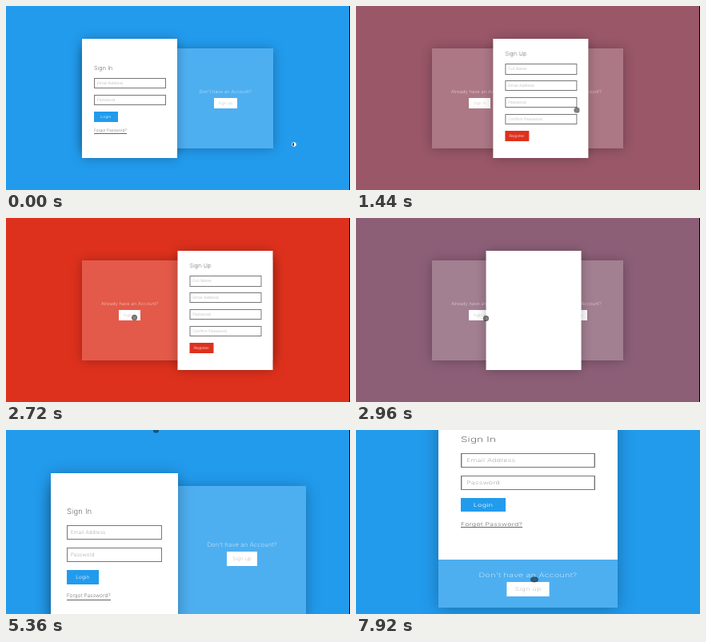
An HTML page that plays this animation: 430 px wide and 230 px high, repeating every 8 s.

```html
<!DOCTYPE html>
<html lang="en">
<head>
<meta charset="utf-8">
<title>Sliding sign in form</title>
<style>
  html, body { margin: 0; width: 100%; height: 100%; overflow: hidden; }
  #stage {
    position: relative; width: 430px; height: 230px; overflow: hidden;
    background: #229bed; color: #333;
    font: 200 16px Inter, Lato, sans-serif;
    letter-spacing: .03em; text-rendering: geometricPrecision;
  }
  #stage div { position: absolute; box-sizing: border-box; white-space: nowrap; }
  .view { left: 0; top: 0; transform-origin: 0 0; }
  .card { left: 0; top: 0; width: 800px; height: 500px; }
  .panel {
    left: 0; top: 40px; width: 100%; height: 420px;
    background: rgba(255, 255, 255, .2);
    box-shadow: 0 5px 45px rgba(0, 0, 0, .28);
  }
  .box { top: 40px; width: 400px; height: 420px; }
  .box.left { left: 0; }
  .box.right { left: 400px; }
  .ask {
    top: 170px; width: 100%; line-height: 30px; text-align: center;
    font-size: 19.2px; color: rgba(255, 255, 255, .9);
  }
  .switch {
    top: 207px; left: 50%; width: 97px; height: 45px; margin-left: -48.5px;
    line-height: 48px; text-align: center; background: #fff; color: #aaa;
  }
  .left .switch { width: 89px; margin-left: -44.5px; }
  .tap { inset: 0; background: rgba(51, 181, 229, .4); opacity: 0; }
  .sheet {
    left: 0; top: 0; width: 400px; height: 500px; background: #fff;
    box-shadow: 0 5px 45px rgba(0, 0, 0, .28);
  }
  .form { left: 50px; top: 0; width: 300px; height: 500px; }
  .title { font-size: 24px; line-height: 36px; }
  .field {
    width: 300px; height: 45px; padding-left: 10px; line-height: 44px;
    border: 1px solid #777; color: #888;
  }
  .send {
    width: 100px; height: 44px; line-height: 48px; text-align: center;
    color: #fff; background: #229bed; font-weight: 300;
  }
  .up .send { background: #dd311d; }
  .forgot { top: 374px; height: 24px; line-height: 25px; border-bottom: 1px solid #666; }

  .phone .card { width: 400px; height: 650px; }
  .phone .panel { top: 0; height: 650px; }
  .phone .box.right { left: 0; top: 364px; }
  .phone .box.left { display: none; }
  .phone .sheet { box-shadow: none; }
  .phone .form { top: 3px; }

  #edge { right: 0; top: 0; width: 1px; height: 230px; background: #000; }
  #touch, #arrow { left: 0; top: 0; border-radius: 50%; }
  #touch {
    width: 7px; height: 7px; margin: -3.5px;
    background: rgba(20, 20, 20, .52); border: 1px solid rgba(30, 30, 30, .35);
  }
  #arrow {
    width: 6px; height: 6px; margin: -3px; border: 1px solid #dcecf6;
    background: linear-gradient(90deg, #23323e 55%, #fff 55%);
  }
</style>
</head>
<body>
<div id="stage"></div>
<script>
const LOOP = 8000;
const stage = document.getElementById('stage');

const div = (cls, body = '', style = '') => `<div class="${cls}" style="${style}">${body}</div>`;

function form(cls, title, fields, button, top, extra = '') {
  const rows = fields.map((f, i) => div('field', f, `top:${top + 70 * i}px`)).join('');
  const end = top + 70 * fields.length;
  return div('form ' + cls,
    div('title', title, `top:${top - 58}px`) + rows + div('send', button, `top:${end}px`) + extra);
}

const box = (side, ask, label) =>
  div('box ' + side, div('ask', ask) + div('switch', label + div('tap')));

function view(name, zoom, x, y, sx = 1) {
  const card =
    div('panel') +
    box('left', 'Already have an Account?', 'Sign in') +
    box('right', "Don't have an Account?", 'Sign up') +
    div('sheet',
      form('in', 'Sign In', ['Email Address', 'Password'], 'Login', 164,
        div('forgot', 'Forgot Password?')) +
      form('up', 'Sign Up', ['Full Name', 'Email Address', 'Password', 'Confirm Password'],
        'Register', 104));
  return div('view ' + name, div('card', card, `zoom:${zoom}`),
    `transform:translate(${x}px,${y}px) scaleX(${sx})`);
}

stage.innerHTML =
  view('desk', .2987, 95, 41) +
  view('large', .3985, 56, 54) +
  view('phone', .4, 103, 8, 1.4) +
  '<div id="edge"></div><div id="arrow"></div><div id="touch"></div>';

const $ = sel => stage.querySelector(sel);
const start = document.timeline.currentTime ?? performance.now();

// steps: [time, value, easing towards the next step]
function run(el, prop, steps) {
  const all = [...steps];
  if (all[0][0] > 0) all.unshift([0, all[0][1]]);
  const last = all[all.length - 1];
  if (last[0] < LOOP) all.push([LOOP, last[1]]);
  const frames = all.map(([t, value, easing = 'linear']) =>
    ({ offset: t / LOOP, [prop]: value, easing }));
  el.animate(frames, { duration: LOOP, iterations: Infinity }).startTime = start;
}

function show(el, ...spans) {
  const steps = [[0, 0, 'step-end']];
  for (const [from, to] of spans) {
    if (from === 0) steps.length = 0;
    steps.push([from, 1, 'step-end']);
    if (to < LOOP) steps.push([to, 0, 'step-end']);
  }
  run(el, 'opacity', steps);
}

const OPEN = 1150, CLOSE = 2730, SLIDE = 500, DELAY = 250;

const swing = (el, prop, a, b) => run(el, prop, [
  [0, a], [OPEN, a, 'ease-in-out'], [OPEN + SLIDE, b],
  [CLOSE, b, 'ease-in-out'], [CLOSE + SLIDE, a]
]);
swing(stage, 'backgroundColor', '#229bed', '#dd311d');
swing($('.desk .sheet'), 'transform', 'translateX(0px)', 'translateX(400px)');

show($('.desk .in'), [0, OPEN], [CLOSE + DELAY, LOOP]);
show($('.desk .up'), [OPEN + DELAY, CLOSE]);
$('.large .up').style.display = $('.phone .up').style.display = 'none';
show($('.desk .right .tap'), [OPEN, 1300]);
show($('.desk .left .tap'), [CLOSE, 2880]);

show($('.desk'), [0, 5360]);
show($('.large'), [5360, 5680]);
show($('.phone'), [5680, LOOP]);
show($('#edge'), [0, 5680]);

const at = (x, y, sx = 1) => `translate(${x}px,${y}px) scaleX(${sx})`;
run($('.phone'), 'transform', [[7080, at(103, 8, 1.4), 'ease-in-out'], [7900, at(103, -38, 1.4)]]);

show($('#arrow'), [0, 480]);
run($('#arrow'), 'transform', [[0, at(360, 173), 'step-end'], [320, at(357, 172)]]);

show($('#touch'), [480, 5680], [6240, LOOP]);
run($('#touch'), 'transform', [
  [400, at(357, 172), 'ease-in-out'],
  [1040, at(274, 121.5)],
  [1240, at(274, 121.5), 'ease-in'],
  [1600, at(278, 143), 'ease-in-out'],
  [2000, at(226, 165)],
  [2160, at(160, 124)],
  [2880, at(160, 124)],
  [2960, at(162, 125), 'ease-in-out'],
  [3440, at(259, 128), 'ease-in'],
  [4000, at(187, -.5)],
  [5680, at(187, -.5), 'step-end'],
  [6200, at(290, 62, 1.4), 'ease-in-out'],
  [7040, at(223, 226, 1.4)],
  [7080, at(223, 226, 1.4), 'ease-in-out'],
  [7900, at(222.5, 186.5, 1.4)]
]);
</script>
</body>
</html>
```
